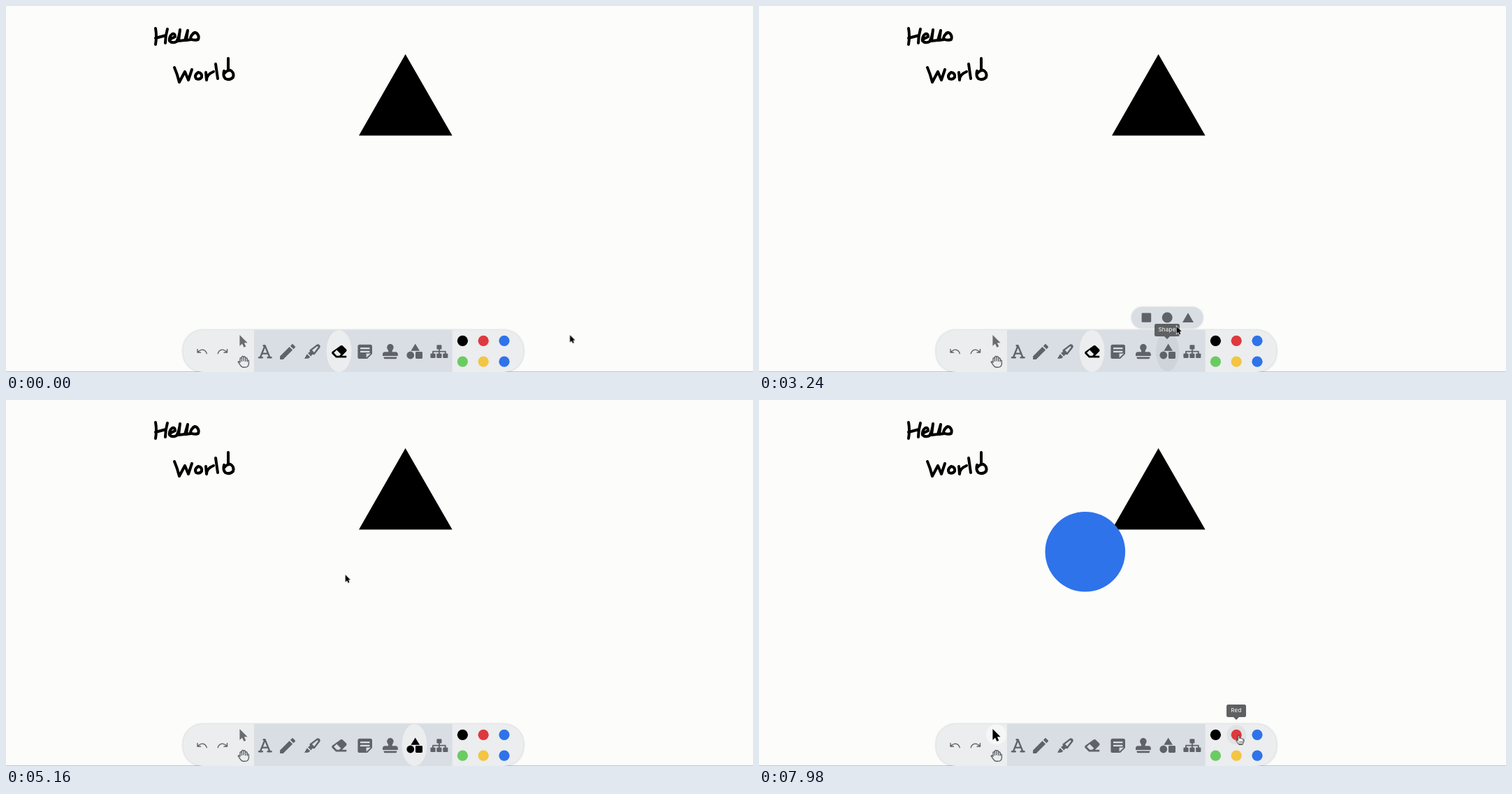
Write an HTML page that moves like this. It is 1069x524 px and loops after 8 s.

```html
<!DOCTYPE html>
<html lang="en">
<head>
<meta charset="utf-8">
<title>Whiteboard</title>
<style>
html, body { margin: 0; width: 100%; height: 100%; overflow: hidden; background: #fcfcfb; }
svg { display: block; width: 1069px; height: 524px; }
text { font: 8px Inter, "Liberation Sans", sans-serif; letter-spacing: .25px; fill: #fff; text-anchor: middle; }

.ink { fill: none; stroke: #000; stroke-width: 4; stroke-linecap: round; stroke-linejoin: round; }
.icon { fill: #5f6368; }
.line { fill: none; stroke: #5f6368; stroke-linecap: round; stroke-linejoin: round; }
.bar { filter: drop-shadow(0 0 1.5px rgba(60, 70, 80, .35)); }
.tip rect, .tip path { fill: #5e6062; }
.lit { fill: #ecedee; }
.dim { fill: #ced4d9; }

/* Hard state changes */
.step { animation: 8s step-end infinite; }
.erase-on { animation-name: eraseOn; }
.erase-ink { animation-name: eraseInk; }
.shape-hover { animation-name: shapeHover; }
.shape-on { animation-name: shapeOn; }
.shape-ink { animation-name: shapeInk; }
.select-on { animation-name: placed; }
.select-ink { animation-name: selectInk; }
.disc { animation-name: placed; }
.menu { animation-name: menu; }
.tip-shape { animation-name: tipShape; }
.tip-circle { animation-name: tipCircle; }
.circle-hover { animation-name: circleHover; }
.tip-red { animation-name: tipRed; }
.red-hover { animation-name: redHover; }
.arrow { animation-name: arrow; }
.hand { animation-name: hand; }

@keyframes eraseOn { 0% { opacity: 1 } 55.6%, 100% { opacity: 0 } }
@keyframes eraseInk { 0% { fill: #000 } 55.6%, 100% { fill: #5f6368 } }
@keyframes shapeHover { 0% { opacity: 0 } 20.8% { opacity: 1 } 55.6%, 100% { opacity: 0 } }
@keyframes shapeOn { 0% { opacity: 0 } 55.6% { opacity: 1 } 68.75%, 100% { opacity: 0 } }
@keyframes shapeInk { 0% { fill: #5f6368 } 55.6% { fill: #000 } 68.75%, 100% { fill: #5f6368 } }
@keyframes placed { 0% { opacity: 0 } 68.75%, 100% { opacity: 1 } }
@keyframes selectInk { 0% { fill: #6a6d70 } 68.75%, 100% { fill: #000 } }
@keyframes menu { 0% { opacity: 0 } 33.75% { opacity: 1 } 55.6%, 100% { opacity: 0 } }
@keyframes tipShape { 0% { opacity: 0 } 29% { opacity: 1 } 42.5%, 100% { opacity: 0 } }
@keyframes tipCircle { 0% { opacity: 0 } 46% { opacity: 1 } 55.6%, 100% { opacity: 0 } }
@keyframes circleHover { 0% { opacity: 0 } 43% { opacity: 1 } 55.6%, 100% { opacity: 0 } }
@keyframes tipRed { 0% { opacity: 0 } 95%, 100% { opacity: 1 } }
@keyframes redHover { 0% { opacity: 0 } 92%, 100% { opacity: 1 } }
@keyframes arrow { 0% { opacity: 1 } 8% { opacity: 0 } 39% { opacity: 1 } 43% { opacity: 0 } 58.5% { opacity: 1 } 90%, 100% { opacity: 0 } }
@keyframes hand { 0% { opacity: 0 } 8% { opacity: 1 } 39% { opacity: 0 } 43% { opacity: 1 } 58.5% { opacity: 0 } 90%, 100% { opacity: 1 } }

.cursor { animation: travel 8s ease-in-out infinite; }
@keyframes travel {
  0% { transform: translate(807px, 471px) }
  4% { transform: translate(867px, 486px); animation-timing-function: ease-in }
  10.25% { transform: translate(648px, 486px); animation-timing-function: ease-out }
  14.25%, 20% { transform: translate(563px, 484.5px) }
  24%, 36% { transform: translate(580.5px, 491.5px) }
  40.5%, 41.75% { transform: translate(597.5px, 458.5px) }
  46% { transform: translate(586px, 444px) }
  51%, 56.5% { transform: translate(588.5px, 441.5px) }
  67.5%, 82% { transform: translate(467px, 215.5px) }
  92% { transform: translate(690px, 484px) }
  95%, 100% { transform: translate(686.5px, 479.5px) }
}
</style>
</head>
<body>
<svg viewBox="0 0 1069 524">
  <defs>
    <path id="pointer" d="M0 0V11.4L2.6 9L4.4 12.8L6.4 11.9L4.7 8.2H8.1Z"/>
    <clipPath id="barClip"><rect x="253.5" y="464" width="487" height="60" rx="28"/></clipPath>
  </defs>

  <!-- Board -->
  <rect y="523" width="1069" height="1" fill="#c2c3c4"/>
  <g class="ink">
    <path d="M214 32Q216 43 214 55M231 33Q228 43 228 53M214 46L229 42"/>
    <path d="M234 48L242 44Q242 39 238 40Q233 44 234 50Q238 54 244 51Q248 44 249 34L247 50L256 49Q258 42 260 35L258 49L265 48"/>
    <path d="M270 38Q264 42 264 47Q269 50 275 48Q277 43 273 39Q271 37 268 39"/>
    <path d="M241 88Q245 97 248 109L256 94L261 106L266 91"/>
    <path d="M275 95Q269 99 272 104Q277 106 280 102Q281 96 275 95M286 95L287 106Q287 98 297 94M300 83L303 104"/>
    <path d="M318 75V91M312 93Q310 100 314 104Q320 107 325 102Q327 95 321 92Q316 92 313 96"/>
  </g>
  <path d="M571.6 69L638.6 185.4H505Z"/>
  <circle class="step disc" cx="466.8" cy="217.3" r="57.3" fill="#2f73ea"/>

  <!-- Toolbar -->
  <g class="bar">
    <g clip-path="url(#barClip)">
      <rect x="253" y="464" width="488" height="60" fill="#ebedee"/>
      <rect x="355" y="464" width="283.5" height="60" fill="#d8dee3"/>
    </g>
  </g>
  <circle class="step select-on" cx="339.5" cy="479" r="14.5" fill="#f5f6f6"/>
  <ellipse class="step erase-on lit" cx="476.5" cy="494" rx="18" ry="30"/>
  <ellipse class="step shape-hover dim" cx="584.5" cy="494" rx="16.5" ry="29"/>
  <ellipse class="step shape-on lit" cx="584.5" cy="494" rx="18" ry="30"/>

  <g class="line" stroke-width="1.4">
    <path id="undo" d="M274 491.5V496H278.5M274.5 495.5Q278 491.6 282 492.2Q286 493 287.3 497.6"/>
    <use href="#undo" transform="translate(590.5) scale(-1 1)"/>
    <path d="M335 510V504.5Q336.2 502.8 337.4 504.5V508.5M337.4 508V502.4Q338.7 500.7 340 502.4V508M340 502.5Q341.3 500.9 342.6 502.8V508.5M342.6 504.5Q344 502.9 345.2 504.8V509M345.2 507.5Q347 506.3 347.4 508.2V512.5Q346.8 517.2 342 517.3H339.5Q337 517 335.4 514.3L332.2 509.6Q332.8 508 335 510.2"/>
    <path stroke-width="2.4" d="M364 503L370.6 486.4L377.4 503M366.4 497.6H375M368.6 486.2H370.6M362 503.2H366.8M374.6 503.2H379.6"/>
  </g>
  <use class="step select-ink" href="#pointer" transform="translate(334.4 471) scale(1.38)"/>

  <g class="icon">
    <path transform="translate(388.4 480.4) scale(1.22)" d="M3 17.25V21h3.75L17.81 9.94l-3.75-3.75L3 17.25zM20.71 7.04c.39-.39.39-1.02 0-1.41l-2.34-2.34c-.39-.39-1.02-.39-1.41 0l-1.83 1.83 3.75 3.75 1.83-1.83z"/>
    <path d="M434.5 492.5L445 484.5Q447 483.5 448.8 485.2Q450.5 487 449.4 489L441.4 499.2L438.5 498.8L436.4 501.4L432 497L434.8 494.9ZM438 492.8L441 496L446.8 488.3L445.5 487Z" fill-rule="evenodd"/>
    <path d="M430.8 498.2L435.2 502.5L433 504.4L427 505Z"/>
  </g>
  <path class="step erase-ink" fill-rule="evenodd" d="M478.8 486.3Q480.3 485.3 481.8 486.5L487 491.6Q488.2 493.1 487 494.6L480.8 500.8H487.2V503.5H472.2L466.6 498Q465.6 496.5 466.6 495.1ZM469.2 496.4L473.4 500.8H477L479.2 498.6L473.2 492.5Z"/>
  <g class="icon">
    <path fill-rule="evenodd" d="M506 484.8H521.4Q524 484.8 524 487.4V498L517 505H506Q503.4 505 503.4 502.4V487.4Q503.4 484.8 506 484.8ZM507 489V491.2H520.4V489ZM507 493.8V496H520.4V493.8ZM515.6 503.4L522 497.6H515.6Z"/>
    <path d="M549.9 483.8A4.8 4.8 0 0 1 553.8 491.4Q552.4 493 552.6 495.2H557.6Q560.8 495.4 560.8 498.6V501H539V498.6Q539 495.4 542.2 495.2H547.2Q547.4 493 546 491.4A4.8 4.8 0 0 1 549.9 483.8ZM540.6 502.4H559.2V503.8Q559 505.3 557.4 505.3H542.4Q540.8 505.3 540.6 503.8Z"/>
    <g class="step shape-ink">
      <path d="M585.7 483.4L592 493.8H579.4Z"/>
      <circle cx="578.8" cy="500" r="5.4"/>
      <rect x="586" y="495" width="10" height="10" rx="1.4"/>
    </g>
    <rect x="616.4" y="485.2" width="7" height="6.4" rx="1.2"/>
    <rect x="607.4" y="497.4" width="7.2" height="6.6" rx="1.2"/>
    <rect x="616.3" y="497.4" width="7.2" height="6.6" rx="1.2"/>
    <rect x="625.2" y="497.4" width="7.2" height="6.6" rx="1.2"/>
    <path class="line" stroke-width="1.8" d="M619.9 491V498M611 498V494.6H628.8V498"/>
  </g>

  <!-- Palette -->
  <circle class="step red-hover" cx="683.2" cy="479.3" r="14" fill="#e0e2e3"/>
  <g>
    <circle cx="653.4" cy="479.3" r="7.6"/>
    <circle cx="683.2" cy="479.3" r="7.6" fill="#de393e"/>
    <circle cx="713" cy="479.3" r="7.6" fill="#2f73ea"/>
    <circle cx="653.4" cy="509.2" r="7.6" fill="#6bcb63"/>
    <circle cx="683.2" cy="509.2" r="7.6" fill="#f3c543"/>
    <circle cx="713" cy="509.2" r="7.6" fill="#2f73ea"/>
  </g>

  <!-- Shape menu -->
  <g class="step menu">
    <rect class="bar" x="533.5" y="431.5" width="101.5" height="29.5" rx="14.7" fill="#d8dee3"/>
    <circle class="step circle-hover dim" cx="584.2" cy="446" r="14"/>
    <g class="icon">
      <rect x="547.6" y="439.4" width="13.6" height="13.4" rx="1.4"/>
      <circle cx="584.2" cy="446" r="7.5"/>
      <path d="M614 439.2L622 453H606Z"/>
    </g>
  </g>

  <!-- Tooltips -->
  <g class="step tip tip-shape">
    <rect x="566" y="455" width="36" height="18" rx="2.5"/>
    <path d="M580 473H588L584 477Z"/>
    <text x="584" y="466.4">Shape</text>
  </g>
  <g class="step tip tip-circle">
    <rect x="567" y="402.8" width="34" height="18" rx="2.5"/>
    <path d="M580 420.8H588L584 425Z"/>
    <text x="584" y="414.2">Circle</text>
  </g>
  <g class="step tip tip-red">
    <rect x="669" y="436" width="28" height="18" rx="2.5"/>
    <path d="M679 454H687L683 458Z"/>
    <text x="683" y="447.4">Red</text>
  </g>

  <!-- Mouse -->
  <g class="cursor">
    <use class="step arrow" href="#pointer" transform="scale(.92)" stroke="#fff" stroke-width="1.6" paint-order="stroke"/>
    <g class="step hand" fill="#fff" stroke="#111" stroke-linejoin="round">
      <path d="M-1.2 8.2V1.2Q0 -.4 1.2 1.2V5Q2.5 3.9 3.4 5.3Q4.6 4.6 5.3 5.9Q6.6 5.3 6.9 6.9V9.4Q6.6 11.4 5.6 13.2H0Q-2 10.3 -3.8 8.1Q-3.3 6.3 -1.2 8.2Z"/>
      <path fill="none" stroke-width=".7" d="M1.2 8.8V11.2M3 8.8V11.2M4.8 8.8V11.2"/>
    </g>
  </g>
</svg>
</body>
</html>
```
